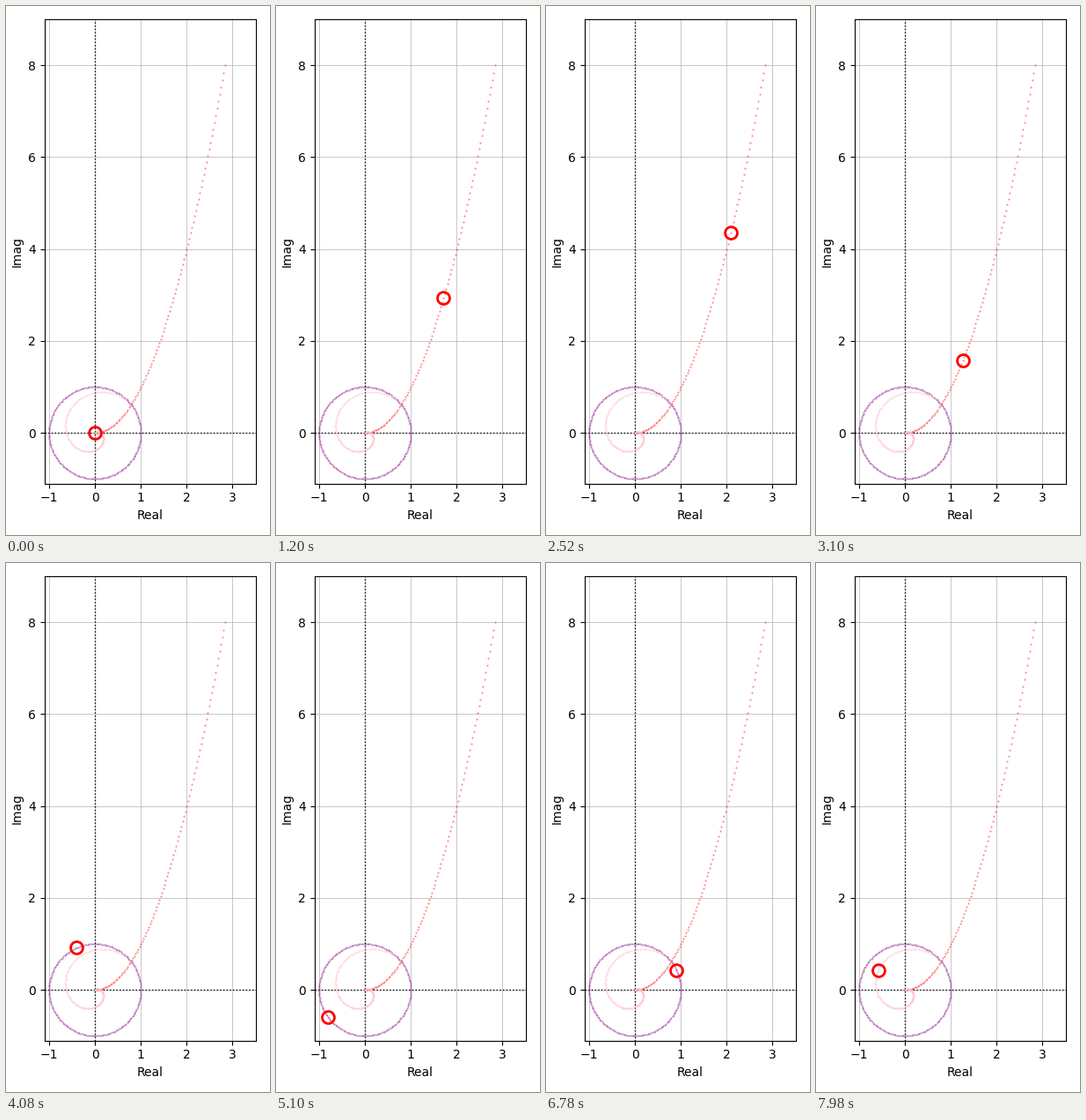
A matplotlib script that plays this animation: 300x600 px, repeating every 8000 ms.

```python
import numpy as np
import matplotlib.pyplot as plt
from matplotlib.animation import FuncAnimation

W, H, DPI = 300, 600, 100
SCALE = 52.13            # pixels per data unit
LEFT, BOTTOM = 43.72, 58.45
XLIM, YLIM = (-1.1, 3.5), (-1.1, 9)
STEP_MS = 20
FRAMES = 400

# Out along the parabola, back to the unit circle, once round, then spiral in.
x = np.linspace(0, np.sqrt(8), 100)
parabola = x + 1j * x**2
back = parabola[:29:-1]
turn = np.linspace(0, 2 * np.pi, 180)
circle = np.exp(1j * (turn + np.pi / 4))
spiral = circle * np.linspace(1, 0, 180)
path = np.concatenate([parabola, back, circle, spiral])

fig = plt.figure(figsize=(W / DPI, H / DPI), dpi=DPI, facecolor="white")
ax = fig.add_axes([
    LEFT / W,
    BOTTOM / H,
    (XLIM[1] - XLIM[0]) * SCALE / W,
    (YLIM[1] - YLIM[0]) * SCALE / H,
])
ax.set(xlim=XLIM, ylim=YLIM, xlabel="Real", ylabel="Imag",
       xticks=range(-1, 4), yticks=range(0, 9, 2))
ax.grid(True, lw=0.5)
ax.axhline(0, color="k", ls=":", lw=1)
ax.axvline(0, color="k", ls=":", lw=1)


def dots(z, color):
    ax.plot(z.real, z.imag, ".", color=color, ms=1, alpha=0.5)


dots(parabola, "red")
dots(circle, "purple")
dots(spiral, "pink")
ring, = ax.plot([], [], "o", ms=10, mew=2, mfc="none", mec="red", zorder=5)


def draw(i):
    ring.set_data([path[i].real], [path[i].imag])
    return ring,


anim = FuncAnimation(fig, draw, frames=FRAMES, interval=STEP_MS,
                     blit=True, repeat=True, repeat_delay=0)
plt.show()
```
